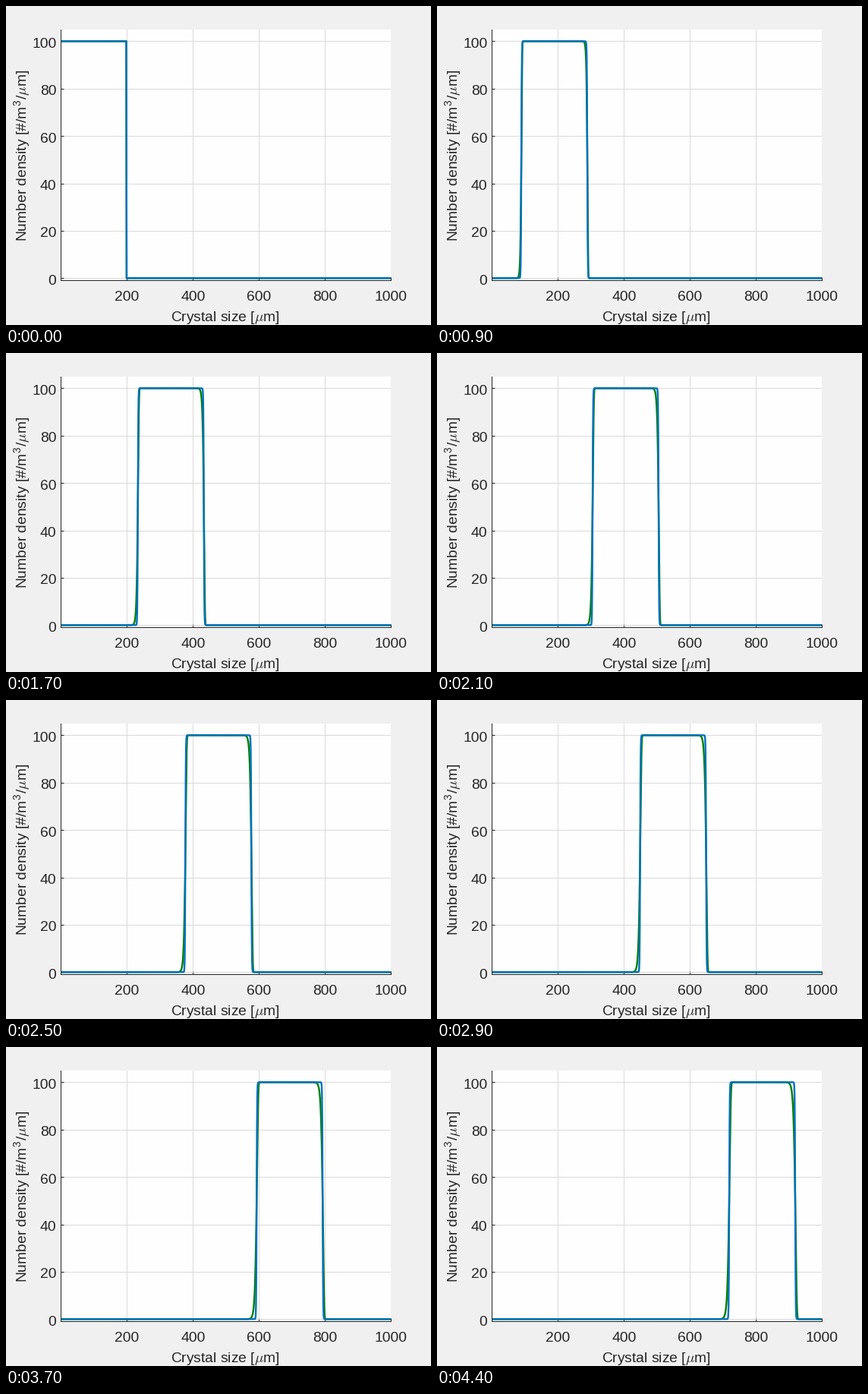
A matplotlib script for the animation above (4.6 s loop, 560 px wide and 420 px high).

```python
import numpy as np
import matplotlib.pyplot as plt
from matplotlib.animation import FuncAnimation

W, H, DPI = 560, 420, 100
PX = 72 / DPI                      # one pixel in points
LEFT, RIGHT, TOP, BOTTOM = 72.4, 506.8, 30.8, 361.4
INK, GRID, BACK = "#262626", "#dadada", "#f0f0f0"
BLUE, GREEN = "#0072bd", "#008000"

FRAMES, HOLD, STEPS = 46, 4, 40    # start pause, then 40 growth steps
GROWTH = 18                        # micrometres per step
PEAK, WIDTH = 100, 200

plt.rcParams.update({
    "font.family": "Liberation Sans",
    "font.size": 19.3 * PX,
    "mathtext.fontset": "cm",
    "text.color": INK,
})

fig = plt.figure(figsize=(W / DPI, H / DPI), dpi=DPI, facecolor=BACK)
ax = fig.add_axes([LEFT / W, 1 - BOTTOM / H, (RIGHT - LEFT) / W, (BOTTOM - TOP) / H])
ax.set(xlim=(1, 1000), ylim=(-1, 105), facecolor="#fefefe")
ax.set_axisbelow(True)
ax.set_xticks(range(200, 1001, 200))
ax.set_yticks(range(0, 101, 20))
ax.tick_params(direction="in", length=4.3 * PX, width=PX, color=INK,
               labelbottom=False, labelleft=False)
ax.grid(color=GRID, linewidth=PX)
for side, spine in ax.spines.items():
    spine.set(color=INK, linewidth=PX, visible=side in ("left", "bottom"))


def label(x, y, text, **kw):
    """Put text with its baseline at pixel (x, y) from the top left."""
    fig.text(x / W, 1 - y / H, text, va="baseline", rotation_mode="anchor", **kw)


for v in range(200, 1001, 200):
    label(LEFT + (v - 1) / 999 * (RIGHT - LEFT) + 0.5, 388, str(v), ha="center")
for v in range(0, 101, 20):
    y = BOTTOM - (v + 1) / 106 * (BOTTOM - TOP)
    label(66.3, y + 8.4, str(v), ha="right")
label(288.7, 415, r"Crystal size [$\mu$m]", ha="center")
label(27.7, 196.5, r"Number density [#/m$^{\mathregular{3}}$/$\mu$m]",
      ha="center", rotation=90)

x = np.arange(1, 1001)
style = dict(linewidth=2.4 * PX, solid_joinstyle="round",
             solid_capstyle="butt", snap=False)
smeared, = ax.plot(x, 0 * x, color=GREEN, **style)
sharp, = ax.plot(x, 0 * x, color=BLUE, **style)


def logistic(d, scale):
    return 1 / (1 + np.exp(-np.clip(d / scale, -40, 40)))


def lagging(d, scale):
    """Rising front with a long tail behind it, half height at d = 0."""
    u = np.clip(d / scale + np.log(np.log(2)), -40, 5)
    return 1 - np.exp(-np.exp(u))


def pulse(front, start, scale):
    return PEAK * (front(x - start, scale) - front(x - start - WIDTH, scale))


def update(i):
    step = min(max(i - HOLD, 0), STEPS)
    if step == 0:
        block = np.where(x < WIDTH, PEAK, 0)
        smeared.set_ydata(block)
        sharp.set_ydata(block)
    else:
        start = GROWTH * step
        smeared.set_ydata(pulse(lagging, start, 1.08 * step ** (1 / 3)))
        sharp.set_ydata(pulse(logistic, start, 0.7))
    return smeared, sharp


anim = FuncAnimation(fig, update, frames=FRAMES, interval=100,
                     repeat=True, repeat_delay=0, blit=False)
plt.show()
```
